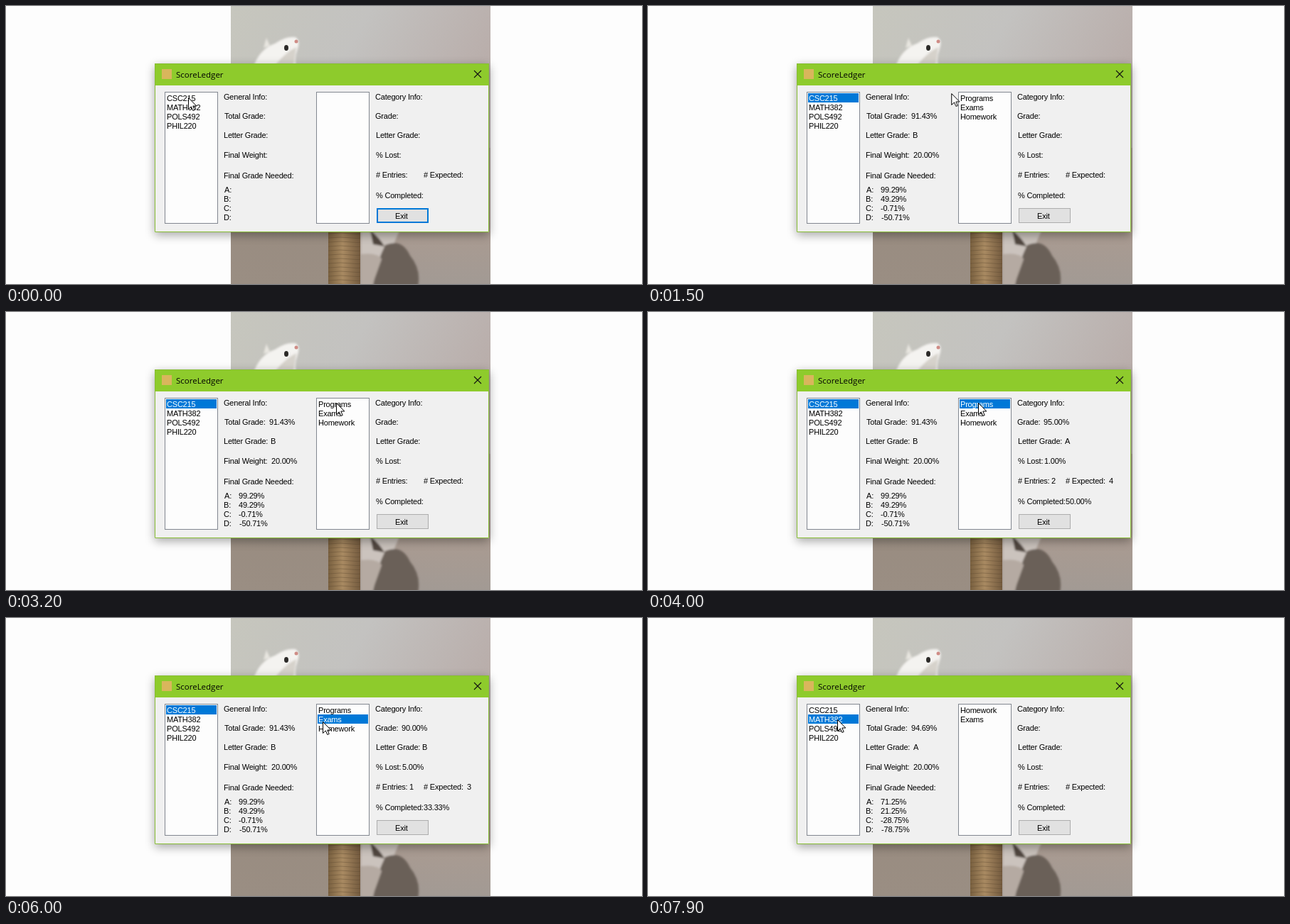
Write an HTML page that moves like this. It is 894x392 px and loops after 8000 ms.

```html
<!DOCTYPE html>
<html lang="en">
<head>
<meta charset="utf-8">
<title>Grades</title>
<style>
  html, body { margin: 0; width: 100%; height: 100%; overflow: hidden; background: #fdfdfd; }
  svg { display: block; width: 894px; height: 392px; }
  text { font: 11px "Liberation Sans", Arial, sans-serif; letter-spacing: -.2px; fill: #000; white-space: pre; }
  .title { font: 11.5px "Open Sans", "Noto Sans", sans-serif; letter-spacing: 0; }
  .pick rect { fill: #0078d7; height: 13px; }
  .pick text { fill: #fff; }
  .box { fill: #fdfdfd; stroke: #828790; }

  /* Interface states switch hard, all on one 8 s clock */
  .state { animation: 8s step-end infinite; }
  .start { animation-name: start; }
  .first { animation-name: first; }
  .second { animation-name: second; }
  .programs { animation-name: programs; }
  .exams { animation-name: exams; }
  @keyframes start { 0% { opacity: 1 } 2.5%, 100% { opacity: 0 } }
  @keyframes first { 0% { opacity: 0 } 2.5% { opacity: 1 } 92.5%, 100% { opacity: 0 } }
  @keyframes second { 0% { opacity: 0 } 92.5%, 100% { opacity: 1 } }
  @keyframes programs { 0% { opacity: 0 } 42.5% { opacity: 1 } 63.75%, 100% { opacity: 0 } }
  @keyframes exams { 0% { opacity: 0 } 63.75% { opacity: 1 } 92.5%, 100% { opacity: 0 } }

  /* The pointer advances every 100 ms and rests around each click */
  .pointer { animation: point 8s linear infinite; }
  @keyframes point {
    0% { transform: translate(256px, 129px); }
    6.25% { transform: translate(256px, 129px); animation-timing-function: steps(4); }
    11.25% { transform: translate(313px, 114px); animation-timing-function: steps(8); }
    21.25% { transform: translate(464px, 126px); }
    28.75% { transform: translate(464px, 126px); animation-timing-function: steps(9); }
    40% { transform: translate(464px, 128px); }
    56.25% { transform: translate(464px, 128px); animation-timing-function: steps(4); }
    61.25% { transform: translate(460px, 141px); }
    71.25% { transform: translate(460px, 141px); animation-timing-function: steps(3); }
    75% { transform: translate(445px, 146px); animation-timing-function: steps(10); }
    87.5%, 100% { transform: translate(266px, 143px); }
  }
</style>
</head>
<body>
<svg viewBox="0 0 894 392">
  <defs>
    <linearGradient id="wall" x2="1" y2=".3">
      <stop stop-color="#c6c6bd"/><stop offset=".5" stop-color="#c3c2c0"/><stop offset="1" stop-color="#b9aeab"/>
    </linearGradient>
    <linearGradient id="floor" x2="0" y2="1">
      <stop stop-color="#988a7e"/><stop offset="1" stop-color="#9a8e83"/>
    </linearGradient>
    <linearGradient id="rug" x2="0" y2="1">
      <stop stop-color="#ad9f97"/><stop offset=".5" stop-color="#ac9b90"/><stop offset="1" stop-color="#a29a94"/>
    </linearGradient>
    <linearGradient id="post">
      <stop stop-color="#79603f"/><stop offset=".45" stop-color="#a98a62"/><stop offset="1" stop-color="#735a3e"/>
    </linearGradient>
    <pattern id="rope" width="47" height="6" patternUnits="userSpaceOnUse">
      <path d="M0 2Q24 5 47 2" fill="none" stroke="#59452e" stroke-opacity=".4"/>
    </pattern>
    <filter id="soft" x="-30%" y="-30%" width="160%" height="160%"><feGaussianBlur stdDeviation="1.5"/></filter>
    <filter id="shade" x="-10%" y="-15%" width="120%" height="130%"><feGaussianBlur stdDeviation="7"/></filter>
    <clipPath id="photo"><path d="M316 0H681V392H316Z"/></clipPath>
  </defs>

  <g clip-path="url(#photo)">
    <path fill="url(#wall)" d="M316 0H681V200H316Z"/>
    <path fill="url(#floor)" d="M316 200H455V392H316Z"/>
    <path fill="url(#rug)" d="M497 200H681V392H497Z"/>
    <g filter="url(#soft)">
      <path fill="#f4f3f0" d="M346 90Q356 60 378 53Q394 42 407 44Q414 49 410 60Q404 76 409 90Z"/>
      <path fill="#d6d2cb" d="M378 84Q392 66 408 58L404 86Z"/>
      <path fill="#e8e6e0" d="M366 45L371 56L362 59Z"/>
      <path fill="#cbc3bd" d="M499 310H556L540 347L524 372L499 350Z"/>
      <path fill="#51473f" d="M512 316Q526 328 532 339L516 336Z"/>
      <path fill="#6b6058" d="M533 337Q557 327 568 352Q584 371 579 396H516Q520 363 533 337Z"/>
      <path fill="#b5aaa2" d="M499 350Q522 347 528 357L514 396H499Z"/>
    </g>
    <ellipse cx="394" cy="59" rx="3" ry="4" fill="#2c2a28"/>
    <circle cx="408" cy="50" r="2.5" fill="#cf8c86"/>
    <path fill="url(#post)" d="M453 310H498V392H453Z"/>
    <path fill="url(#rope)" d="M453 310H498V392H453Z"/>
  </g>

  <rect x="209" y="85" width="470" height="238" opacity=".35" filter="url(#shade)"/>
  <path fill="#f0f0f0" d="M209 81H679V319H209Z"/>
  <path fill="#8ecb2c" d="M209 81H679V112H209Z"/>
  <path fill="none" stroke="#86bd33" d="M209.5 81.5H678.5V318.5H209.5Z"/>
  <rect x="219" y="89" width="14" height="14" fill="#d9b65c"/>
  <text class="title" x="239" y="101">ScoreLedger</text>
  <path fill="none" stroke="#111" stroke-width="1.1" d="M658 91L668 101M668 91L658 101"/>

  <rect class="box" x="223.5" y="121.5" width="74" height="185"/>
  <rect class="box" x="436.5" y="121.5" width="74" height="185"/>
  <text x="226" y="134">CSC215</text>
  <text x="226" y="147">MATH382</text>
  <text x="226" y="160">POLS492</text>
  <text x="226" y="173">PHIL220</text>

  <text x="306" y="132">General Info:</text>
  <text x="307" y="159">Total Grade:</text>
  <text x="306" y="186">Letter Grade:</text>
  <text x="306" y="214">Final Weight:</text>
  <text x="306" y="243">Final Grade Needed:</text>
  <text x="307" y="263">A:</text>
  <text x="306" y="276">B:</text>
  <text x="306" y="289">C:</text>
  <text x="306" y="302">D:</text>

  <text x="519" y="132">Category Info:</text>
  <text x="519" y="159">Grade:</text>
  <text x="520" y="186">Letter Grade:</text>
  <text x="520" y="214">% Lost:</text>
  <text x="520" y="242"># Entries:</text>
  <text x="587" y="242"># Expected:</text>
  <text x="520" y="271">% Completed:</text>

  <rect x="521.5" y="285.5" width="72" height="20" fill="#e1e1e1" stroke="#adadad"/>
  <rect class="state start" x="522" y="286" width="71" height="19" fill="none" stroke="#0078d7" stroke-width="2"/>
  <text x="547" y="300">Exit</text>

  <g class="state first">
    <g class="pick"><rect x="225" y="123" width="71"/><text x="226" y="134">CSC215</text></g>
    <text x="370" y="159">91.43%</text>
    <text x="372" y="186">B</text>
    <text x="373" y="214">20.00%</text>
    <text x="327" y="263">99.29%</text>
    <text x="327" y="276">49.29%</text>
    <text x="327" y="289">-0.71%</text>
    <text x="328" y="302">-50.71%</text>
    <text x="439" y="134">Programs</text>
    <text x="439" y="147">Exams</text>
    <text x="439" y="160">Homework</text>
  </g>

  <g class="state second">
    <g class="pick"><rect x="225" y="136" width="71"/><text x="226" y="147">MATH382</text></g>
    <text x="370" y="159">94.69%</text>
    <text x="373" y="186">A</text>
    <text x="373" y="214">20.00%</text>
    <text x="327" y="263">71.25%</text>
    <text x="327" y="276">21.25%</text>
    <text x="327" y="289">-28.75%</text>
    <text x="328" y="302">-78.75%</text>
    <text x="439" y="134">Homework</text>
    <text x="439" y="147">Exams</text>
  </g>

  <g class="state programs">
    <g class="pick"><rect x="438" y="123" width="71"/><text x="439" y="134">Programs</text></g>
    <text x="556" y="159">95.00%</text>
    <text x="586" y="186">A</text>
    <text x="557" y="214">1.00%</text>
    <text x="567" y="242">2</text>
    <text x="648" y="242">4</text>
    <text x="587" y="271">50.00%</text>
  </g>

  <g class="state exams">
    <g class="pick"><rect x="438" y="136" width="71"/><text x="439" y="147">Exams</text></g>
    <text x="556" y="159">90.00%</text>
    <text x="585" y="186">B</text>
    <text x="557" y="214">5.00%</text>
    <text x="567" y="242">1</text>
    <text x="648" y="242">3</text>
    <text x="587" y="271">33.33%</text>
  </g>

  <g class="pointer">
    <path fill="#fff" stroke="#000" d="M.5 .5V16.5L4.3 12.9L6.8 18.5L9.2 17.5L6.8 12H11.8Z"/>
  </g>
</svg>
</body>
</html>
```
